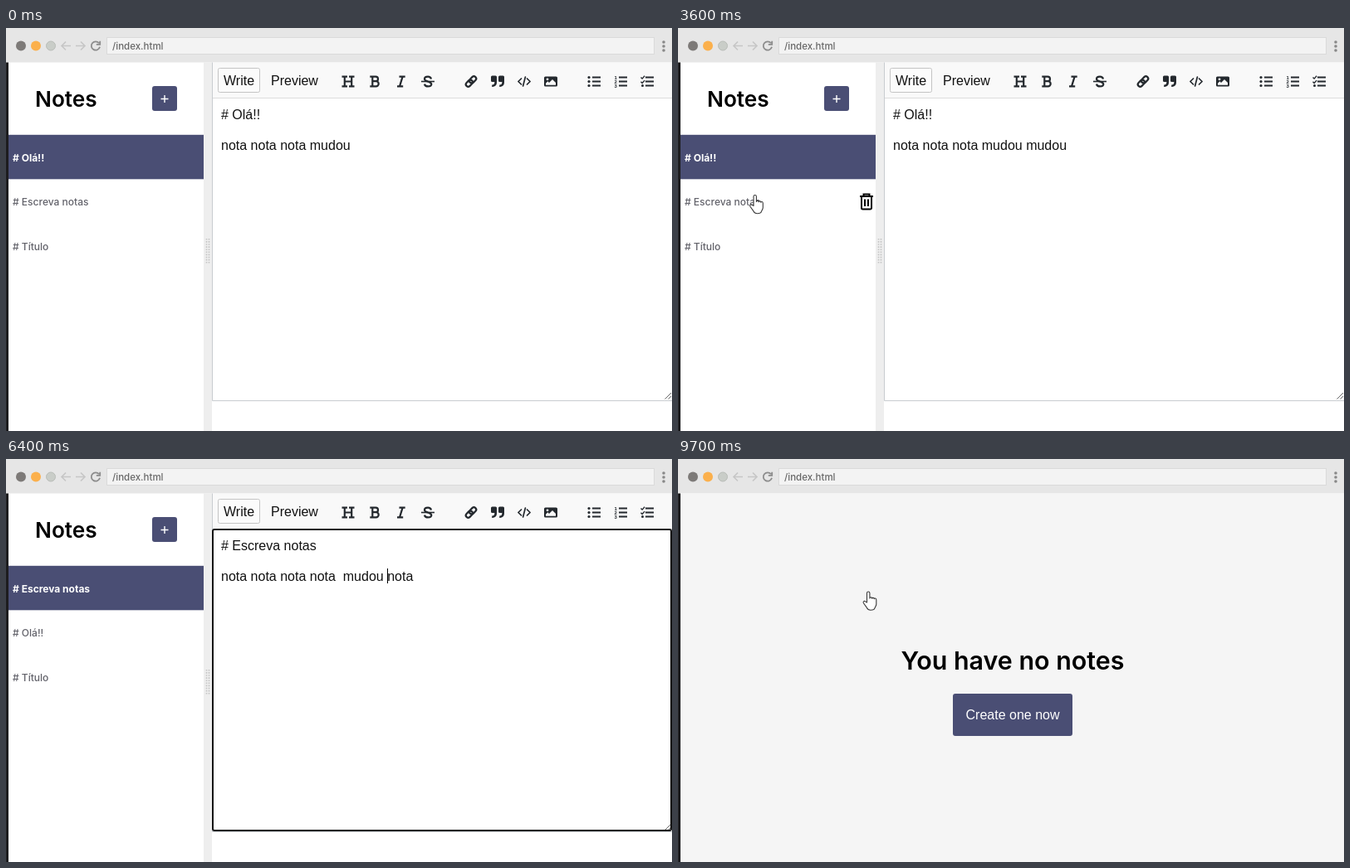
These frames come from a looping animation (802 by 486 pixels, 9900 ms). An HTML page:

```html
<!DOCTYPE html>
<html lang="pt">
<head>
<meta charset="utf-8">
<title>Notes</title>
<style>
  html, body { margin: 0; width: 100%; height: 100%; overflow: hidden; background: #fff; }
  svg { display: block; width: 802px; height: 486px; }
  text { white-space: pre; }
  .ui { font-family: Inter, sans-serif; }
  .type { font: 16px "Liberation Sans", Arial, sans-serif; fill: #111; }
  .row { font-size: 12px; font-weight: 500; fill: #62626a; }
  .row.on { font-weight: 700; fill: #fff; }
  .head { font-weight: 600; fill: #000; }
  .brand { fill: #4a4e74; }
  .line { fill: none; stroke: #24292e; stroke-width: 2.2; }
  .solid { fill: #24292e; }
  .round { stroke-linecap: round; stroke-linejoin: round; }
  .num { font: bold 6px "Liberation Sans", Arial, sans-serif; fill: #24292e; }
  .off { display: none; }
</style>
</head>
<body>
<svg viewBox="0 0 802 486">
  <defs>
    <path id="quote" d="M585.5 57.5h4a1.5 1.5 0 0 1 1.5 1.5v7a5 5 0 0 1-5 5h-.8v-2.6h.8a2.3 2.3 0 0 0 2.3-2.4v-1h-2.8a1.5 1.5 0 0 1-1.5-1.5V59a1.5 1.5 0 0 1 1.5-1.5z"/>
    <path id="bars" d="M706 59.5h10M706 64.5h10M706 69.5h10"/>
  </defs>

  <!-- Browser bar -->
  <rect width="802" height="41.5" fill="#e6e6e6"/>
  <rect y="41.5" width="3" height="445" fill="#1d1d1f"/>
  <circle cx="18" cy="21.5" r="6" fill="#7d7a78"/>
  <circle cx="36" cy="21.5" r="6" fill="#fbb04c"/>
  <circle cx="54" cy="21.5" r="5.5" fill="#c9cdc8" stroke="#b9bdb8"/>
  <g fill="none" stroke="#c6c6c6" stroke-width="1.6">
    <path d="M78 21.5H67M72 16.5l-5 5 5 5M84 21.5h11M90 16.5l5 5-5 5"/>
    <path d="M112 18.2a5.2 5.2 0 1 0 1 4.6M113.2 15.8v4h-4.4" stroke="#8c8c8c" stroke-width="1.8"/>
  </g>
  <rect x="121.5" y="11.5" width="659" height="20" fill="#f3f3f3" stroke="#dadada"/>
  <text class="ui" x="128" y="25.5" font-size="11.5" font-weight="500" fill="#686868">/index.html</text>
  <g fill="#888"><circle cx="792" cy="17" r="1.8"/><circle cx="792" cy="22" r="1.8"/><circle cx="792" cy="27" r="1.8"/></g>

  <g id="app">
    <!-- Sidebar -->
    <text class="ui head" x="35" y="95" font-size="26.2">Notes</text>
    <rect class="brand" x="176" y="70" width="30" height="30" rx="3"/>
    <path d="M186.5 85.5h9M191 81v9" stroke="#fff" stroke-width="1.4"/>
    <rect id="mark" class="brand" x="3" width="235" height="53.5"/>
    <g id="rows" class="ui">
      <text x="8" y="160.5"/><text x="8" y="214"/><text x="8" y="267.5"/>
    </g>
    <rect x="238" y="41.5" width="10" height="445" fill="#eee"/>
    <path d="M241.5 254v31M244.5 254v31" stroke="#c4c4c4" stroke-width="1.6" stroke-dasharray="1.6 1.5"/>

    <!-- Editor -->
    <rect x="248" y="41.5" width="554" height="43" fill="#f9f9f9"/>
    <path d="M248 84.5h554" stroke="#ddd"/>
    <path d="M248.5 41.5v408H802" fill="none" stroke="#c8ccd0"/>
    <rect x="255.5" y="48.5" width="50" height="29" rx="2" fill="#fbfbfb" stroke="#c4c4c4"/>
    <text class="type" x="262" y="69">Write</text>
    <text class="type" x="319" y="69">Preview</text>

    <g class="line">
      <path d="M404.5 58.6h6.5M413 58.6h6.5M404.5 70.4h6.5M413 70.4h6.5M407.8 58.6v11.8M416.2 58.6v11.8M407.8 64.5h8.4"/>
      <path d="M438.3 58.6h6.9a2.8 2.8 0 0 1 0 5.6h-4M441.3 58.6v11.8M438.3 70.4h7.3a3.1 3.1 0 0 0 0-6.2"/>
      <path d="M473.5 58.6h7.2M471 70.4h7.2M477.6 58.6L474 70.4"/>
      <path d="M512 61.4C511.5 59.3 510 58.6 508 58.6C505.5 58.6 504 59.7 504 61.4C504 63.2 506 63.8 508 64.5C511 65.4 512.3 66 512.3 67.8C512.3 69.6 510.6 70.4 508.2 70.4C506 70.4 504.4 69.5 503.9 67.6"/>
      <path d="M500 64.5h16" stroke-width="1.6"/>
      <g transform="translate(560 64.5) rotate(-45)">
        <rect x="-7.6" y="-2.8" width="9.2" height="5.6" rx="2.8"/>
        <rect x="-1.6" y="-2.8" width="9.2" height="5.6" rx="2.8"/>
      </g>
      <path class="round" stroke-width="1.7" d="M620.5 61l-3.6 3.5 3.6 3.5M627.5 61l3.6 3.5-3.6 3.5M625.4 59l-2.8 11"/>
      <g stroke-width="2">
        <use href="#bars"/><use href="#bars" x="32"/><use href="#bars" x="64"/>
      </g>
      <path stroke-width="1.4" d="M764.5 59.5l1.6 1.6 3-3.3M764.5 64.8l1.6 1.6 3-3.3"/>
    </g>
    <g class="solid">
      <use href="#quote"/><use href="#quote" x="9"/>
      <rect x="648" y="58.5" width="16" height="12" rx="1.6"/>
      <circle cx="702" cy="59.5" r="1.6"/><circle cx="702" cy="64.5" r="1.6"/><circle cx="702" cy="69.5" r="1.6"/>
      <circle cx="766.5" cy="69.5" r="1.5"/>
    </g>
    <path fill="#f9f9f9" d="M650 68.7v-2l2.4-2.4 1.6 1.6 4-4 4 4v2.8z"/>
    <circle cx="652" cy="61.8" r="1.4" fill="#f9f9f9"/>
    <g class="num"><text x="732.5" y="61.8">1</text><text x="732.5" y="66.9">2</text><text x="732.5" y="72">3</text></g>

    <text id="title" class="type" x="259" y="110"/>
    <text id="body" class="type" x="259" y="147"/>
    <path d="M793.5 447.5l7.5-7.5M797.5 447.5l3.5-3.5" stroke="#666"/>
    <rect id="ring" x="249" y="85" width="552" height="363" rx="2" fill="none" stroke="#151515" stroke-width="2"/>
    <rect id="caret" y="132" width="1" height="18"/>
    <path id="bin" class="line" style="stroke:#000;stroke-width:2" d="M219 149.5h16M223.5 149v-2h7v2M221 150v13.5a1.5 1.5 0 0 0 1.5 1.5h9a1.5 1.5 0 0 0 1.5-1.5V150M225 153v8.5M229 153v8.5"/>
    <path id="beam" d="M303.5 187.5q3 0 3 2q0-2 3-2M306.5 189v13M303.5 204q3 0 3-2q0 2 3 2" fill="none" stroke="#222"/>
  </g>

  <g id="empty">
    <rect x="3" y="41.5" width="799" height="445" fill="#f5f5f5"/>
    <text class="ui head" x="403" y="254" font-size="30.4" text-anchor="middle">You have no notes</text>
    <rect class="brand" x="331" y="283" width="144" height="51" rx="3"/>
    <text class="type" x="403" y="313.5" text-anchor="middle" style="fill:#fff">Create one now</text>
  </g>

  <path id="hand" class="round" fill="#fff" stroke="#3a3a3a" stroke-width="1.1" d="M5 13.5V2.2a1.7 1.7 0 0 1 3.4 0V8.5c0-1.6 2.8-1.5 2.8.3c.1-1.4 2.6-1.2 2.6.5c.2-1.2 2.5-1 2.5.9V15.5c0 2.2-1.5 3.4-1.9 4.9q-.5 2.3-5 2.3c-3.6 0-4-1.8-5-3.6L.9 14.2c-1-2 1-3 2.3-1.8z"/>
</svg>

<script>
const LOOP = 9900;
const $ = id => document.getElementById(id);
const OLA = "# Olá!!", NOTES = "# Escreva notas", TITLE = "# Título";
const four = "nota nota nota nota ";
const three = "nota nota nota mudou";

// Each step changes part of the state; `pre` is the text before the caret.
const steps = [
  [0, { rows: [OLA, NOTES, TITLE], sel: 0, pre: three, post: "" }],
  [900, { focus: true, caret: true }],
  [2800, { caret: false }],
  [2900, { hand: [118, 198], bin: 1 }],
  [3000, { hand: [70, 198] }],
  [3300, { hand: [76, 199], caret: true }],
  [3400, { hand: [86, 201] }],
  [3500, { focus: false, caret: false }],
  [3700, { sel: 1, pre: four, post: "nota", hand: [80, 200] }],
  [3900, { hand: null, bin: -1, beam: true }],
  [4000, { beam: false }],
  [4300, { focus: true, caret: true }],
  [4700, { rows: [NOTES, OLA, TITLE], sel: 0 }],
  [7000, { caret: false }],
  [7100, { hand: [212, 160], bin: 0 }],
  [7200, { hand: [206, 160] }],
  [7300, { hand: [203, 160] }],
  [7500, { hand: [211, 160], caret: true }],
  [7600, { hand: [223, 160] }],
  [7800, { focus: false, caret: false }],
  [8000, { rows: [OLA, TITLE], pre: three + " mudou", post: "", bin: -1 }],
  [8800, { hand: [222.5, 159.5], bin: 0 }],
  [9100, { rows: [TITLE], pre: "nota nota nota", bin: -1 }],
  [9600, { bin: 0 }],
  [9700, { empty: true }]
];

function type(start, keys, times) {
  times.forEach((t, i) => steps.push([t, { pre: start + keys.slice(0, i + 1) }]));
}
type(three, " mudou", [1400, 1600, 1800, 1900, 2000, 2200]);
type(four, " mudou ", [4700, 5100, 5400, 5500, 5600, 5900, 6400]);
steps.sort((a, b) => a[0] - b[0]);

const pen = document.createElement("canvas").getContext("2d");
pen.font = '16px "Liberation Sans", Arial, sans-serif';

const show = (id, on) => $(id).classList.toggle("off", !on);
const move = (id, x, y) => $(id).setAttribute("transform", `translate(${x} ${y})`);

function draw(s) {
  [...$("rows").children].forEach((row, i) => {
    row.textContent = s.rows[i] || "";
    row.setAttribute("class", i === s.sel ? "row on" : "row");
  });
  $("mark").setAttribute("y", 128.8 + 53.5 * s.sel);
  $("title").textContent = s.rows[s.sel];
  $("body").textContent = s.pre + s.post;
  $("caret").setAttribute("x", Math.round(259 + pen.measureText(s.pre).width - 0.3));
  show("ring", s.focus);
  show("caret", s.caret);
  show("beam", s.beam);
  show("empty", s.empty);
  show("app", !s.empty);
  show("bin", s.bin >= 0);
  move("bin", 0, 53.5 * s.bin);
  show("hand", s.hand);
  if (s.hand) move("hand", ...s.hand);
}

let last = -1;
function tick() {
  const t = performance.now() % LOOP;
  const past = steps.filter(step => step[0] <= t);
  if (past.length !== last) {
    last = past.length;
    draw(Object.assign({ bin: -1 }, ...past.map(step => step[1])));
  }
  requestAnimationFrame(tick);
}
tick();
</script>
</body>
</html>
```
